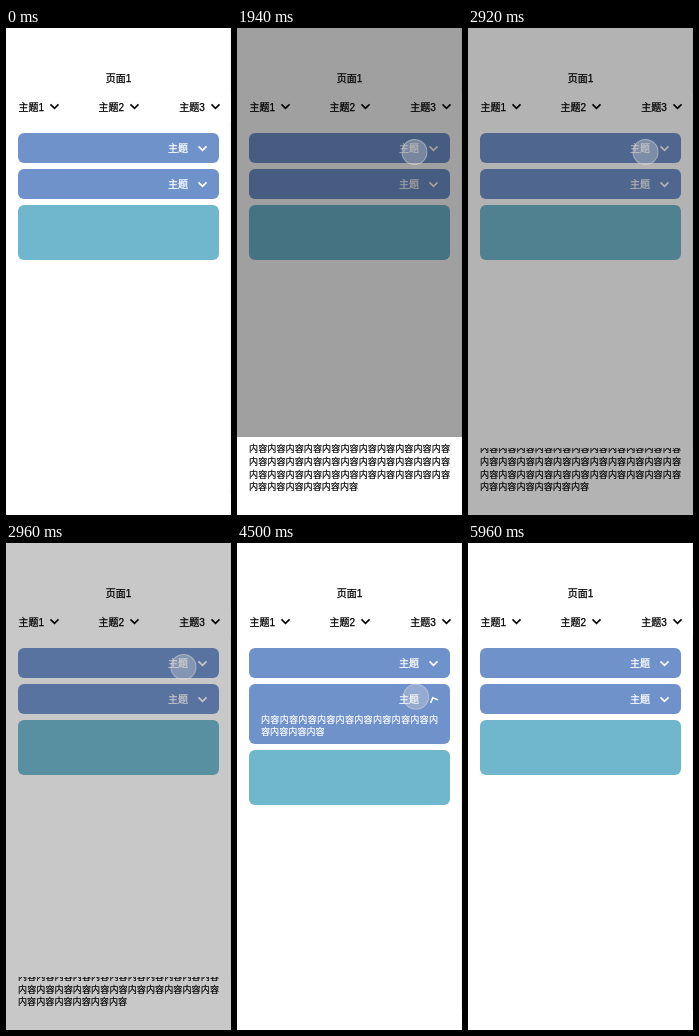
Animation of 225 by 487 pixels, one loop 6.6 s. Source, as an HTML page:

```html
<!DOCTYPE html>
<html lang="zh-CN">
<head>
<meta charset="utf-8">
<style>
  html, body { margin: 0; width: 100%; height: 100%; overflow: hidden; background: #fff; }
  #stage { position: relative; width: 225px; height: 487px; overflow: hidden; background: #fff;
    font: 10px/14px "Liberation Sans", "Noto Sans CJK SC", sans-serif; color: #000; }
  #stage * { position: absolute; margin: 0; }
  .label { white-space: nowrap; font-weight: 500; -webkit-text-stroke: .25px currentColor; }
  .edge { left: 224px; width: 1px; background: #f0f0f0; }
  .card { left: 12px; width: 201px; height: 30px; border-radius: 6px; background: #7092cb; color: #fff; overflow: hidden; }
  .card .label { left: 150px; top: 9px; }
  .card svg { left: 179px; top: 9.6px; }
  svg { width: 11px; height: 11px; fill: none; stroke: currentColor; stroke-width: 1.6; }
  p { font-size: 9.1px; line-height: 12.67px; text-align: justify; -webkit-text-stroke: .15px currentColor; }
  #panel { left: 12px; top: 177px; width: 201px; height: 55px; border-radius: 6px; background: #70b7cd; }
  #dim { inset: 0; background: #000; z-index: 1; }
  #sheet { left: 0; bottom: 0; width: 225px; background: #fff; overflow: hidden; }
  #sheet p { left: 12px; bottom: 21.1px; width: 201px; }
  #detail { left: 12px; top: 29.5px; width: 177px; }
  #touch { left: -13px; top: -13px; width: 26px; height: 26px; box-sizing: border-box;
    border-radius: 50%; border: 1px solid rgba(222, 222, 222, .4);
    background: rgba(222, 222, 222, .33); z-index: 3; }
  #touch.pressed { border: 0; background: rgba(222, 222, 222, .68); }
</style>
</head>
<body>
<div id="stage">
  <div class="edge" style="top:0;height:66px"></div>
  <div class="edge" style="top:93px;height:394px"></div>
  <div class="label" style="left:99.7px;top:44px">页面1</div>
  <div id="tabs"></div>
  <div class="card" style="top:105px"><span class="label">主题</span></div>
  <div class="card" id="fold" style="top:141px"><span class="label">主题</span><p id="detail"></p></div>
  <div id="panel"></div>
  <div id="dim"></div>
  <div id="sheet"><p></p></div>
  <div id="touch"></div>
</div>
<script>
const LOOP = 6600;
const $ = s => document.querySelector(s);
const chevron = '<svg viewBox="0 0 11 11"><path d="M1.5 3.4 5.5 7.4 9.5 3.4"/></svg>';

$('#tabs').innerHTML = [12.4, 92.4, 173.2].map((x, i) =>
  `<div class="label" style="left:${x}px;top:73px">主题${i + 1}</div>` +
  chevron.replace('<svg', `<svg style="left:${x + 30.6}px;top:73.2px"`)).join('');
document.querySelectorAll('.card').forEach(c => c.insertAdjacentHTML('beforeend', chevron));
$('#sheet p').textContent = '内容'.repeat(39);
$('#detail').textContent = '内容'.repeat(13);

const dim = $('#dim'), sheet = $('#sheet'), fold = $('#fold'), panel = $('#panel'),
  touch = $('#touch'), arrow = $('#fold svg');

// cubic-bezier(0, 0, .58, 1), solved by bisection
function easeOut(x) {
  if (x <= 0) return 0;
  if (x >= 1) return 1;
  let lo = 0, hi = 1, s;
  for (let i = 0; i < 20; i++) {
    s = (lo + hi) / 2;
    if (1.74 * (1 - s) * s * s + s ** 3 < x) lo = s; else hi = s;
  }
  return s * s * (3 - 2 * s);
}
const smooth = x => x * x * (3 - 2 * x);
const tween = (t, start, length = 300) => easeOut((t - start) / length);

// time, x, y of the touch point
const path = [[980, 240, 114], [1200, 177.5, 124], [3390, 177.5, 124], [3680, 178, 148.5],
  [3830, 178, 148.5], [3940, 179, 153.8], [5740, 179, 153.8], [5960, 240, 152]];
const presses = [[1600, 1780], [2680, 2880], [4140, 4300], [5440, 5640]];

function touchAt(t) {
  if (t <= path[0][0]) return path[0].slice(1);
  const i = path.findIndex(p => p[0] > t);
  if (i < 0) return path[path.length - 1].slice(1);
  const [t0, x0, y0] = path[i - 1], [t1, x1, y1] = path[i];
  const k = smooth((t - t0) / (t1 - t0));
  return [x0 + (x1 - x0) * k, y0 + (y1 - y0) * k];
}

function draw(t) {
  const closing = t >= 2880;
  const shown = closing ? 1 - tween(t, 2841) : t < 1780 ? 0 : tween(t, 1772, 303);
  dim.style.opacity = shown / 2;
  sheet.style.height = 20 + 78 * shown + 'px';
  sheet.style.zIndex = closing ? 0 : 2;

  const open = tween(t, 4290) - tween(t, 5630);
  fold.style.height = 30 + 34 * open + 'px';
  panel.style.top = 177 + 34 * open + 'px';
  arrow.style.transform = `rotate(${180 * open}deg)`;

  const [x, y] = touchAt(t);
  const pressed = presses.some(([a, b]) => t >= a && t < b);
  touch.className = pressed ? 'pressed' : '';
  touch.style.transform = `translate(${x}px, ${y}px) scale(${pressed ? .96 : 1})`;
}

const begin = performance.now();
(function frame() {
  draw((performance.now() - begin) % LOOP);
  requestAnimationFrame(frame);
})();
</script>
</body>
</html>
```
